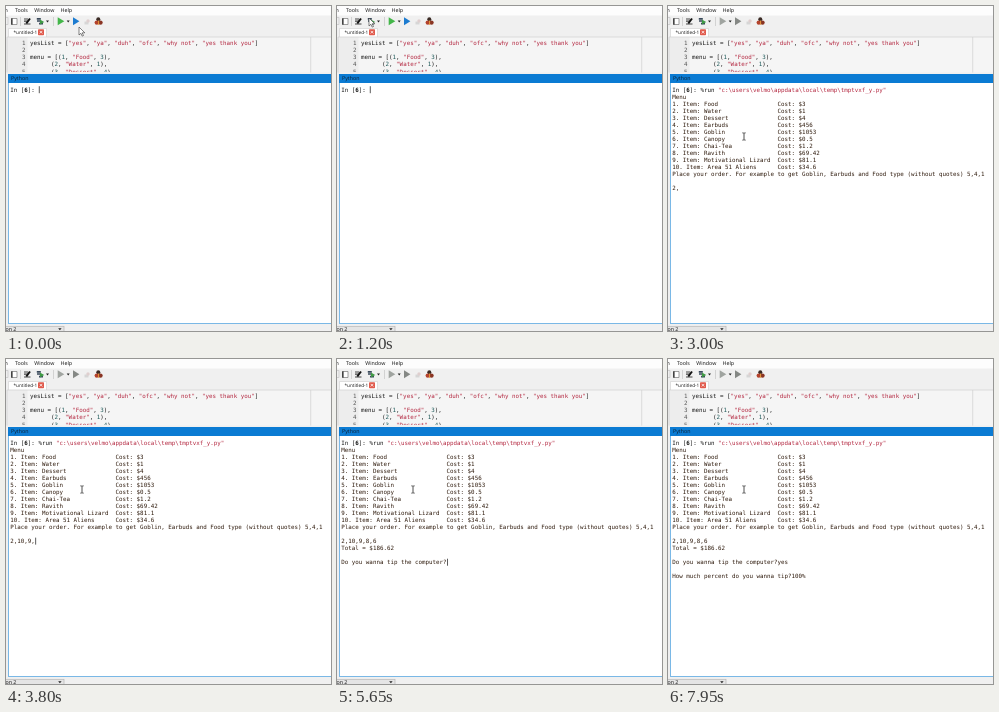
These frames come from a looping animation (325 by 325 pixels, 8000 ms). An HTML page:

```html
<!DOCTYPE html>
<html lang="en">
<head>
<meta charset="utf-8">
<title>Menu console</title>
<style>
  html, body { margin: 0; width: 100%; height: 100%; overflow: hidden; background: #f0f0f0; }
  svg { display: block; width: 100vw; height: 100vh; }
  text { white-space: pre; text-rendering: geometricPrecision; }
  .ui { font: 5.3px "Open Sans", "Noto Sans", sans-serif; fill: #111; }
  .mono { font: 5.84px "DejaVu Sans Mono", monospace; fill: #151515; }
  .out { fill: #2e1a0c; }
  .num { fill: #555; text-anchor: end; }
  .str { fill: #b3263f; }
  .lit { fill: #1f5a5a; }
  .go { fill: #43b649; }
  .step { fill: #1c7bd0; }
  .running .go { fill: #a0a4a0; }
  .running .step { fill: #858885; }
</style>
</head>
<body>
<svg id="stage" viewBox="0 0 325 325">
  <rect width="325" height="325" fill="#f0f0f0"/>
  <rect width="325" height="9.5" fill="#fdfdfd"/>
  <g class="ui">
    <text x="-1.5" y="6.4">n</text>
    <text x="9" y="6.4">Tools</text>
    <text x="28.3" y="6.4">Window</text>
    <text x="54.5" y="6.4">Help</text>
  </g>

  <g id="toolbar">
    <path d="M0 11.5h2v7h-2M14.5 11v9M47.5 11v9" fill="none" stroke="#c4c4c4" stroke-width=".7"/>
    <path d="M6 12.5h5v6h-5z" fill="#fff" stroke="#777" stroke-width=".7"/>
    <path d="M5.8 12.2v6.6" stroke="#222" stroke-width="1.2"/>
    <path d="M18 13h4M18 15.2h4M18 18h6.5" stroke="#444" stroke-width="1.2"/>
    <path d="M20.3 17.5l3.7-5" stroke="#111" stroke-width="2"/>
    <path d="M30.8 12.8h4M31 15h4M33 17.6h4" stroke="#39485a" stroke-width="1.7"/>
    <path d="M34 13.6l4.2 2.4-4.2 2.4z" fill="#3f9a44"/>
    <path d="M40 14.6h3l-1.5 1.8zM60.7 14.6h3l-1.5 1.8z" fill="#222"/>
    <path class="go" d="M51.7 11.3l6.6 4-6.6 4z"/>
    <path class="step" d="M67 11.3l6.4 4-6.4 4z"/>
    <path d="M78.5 15.5h4v3h-4z" fill="#d6d6d6"/>
    <circle cx="82" cy="15" r="1.7" fill="#dfcfcf"/>
    <circle cx="92.3" cy="13.2" r="2" fill="#3a2a24"/>
    <circle cx="90.8" cy="16.6" r="2.2" fill="#b4432c"/>
    <circle cx="94.5" cy="16.6" r="2.2" fill="#8a3524"/>
    <path d="M92.6 14.5v4.3" stroke="#e79a3c" stroke-width="1"/>
  </g>

  <path d="M2.5 31V22.5H40.5V31" fill="#fff" stroke="#cfcfcf" stroke-width=".6"/>
  <text class="ui" x="7.5" y="28" style="font-size:4.7px">*untitled-1</text>
  <rect x="32" y="23.2" width="6" height="6" rx=".8" fill="#e05a4c"/>
  <path d="M33.7 24.9l2.6 2.6m0-2.6l-2.6 2.6" stroke="#fff" stroke-width=".8"/>

  <rect x="1" y="31" width="324" height="35.5" fill="#f5f5f5"/>
  <rect x="1" y="31" width="20.5" height="35.5" fill="#ededed"/>
  <path d="M1 31h324M1 31v35.5M304.7 31v35.5" fill="none" stroke="#cfcfcf" stroke-width=".7"/>
  <clipPath id="editorClip"><rect x="1" y="31" width="324" height="35"/></clipPath>
  <g id="editor" class="mono" clip-path="url(#editorClip)"></g>

  <rect x="2" y="68" width="323" height="250" fill="#7ab8e6"/>
  <rect x="2" y="68" width="323" height="9" fill="#0b7bd3"/>
  <rect x="3" y="77" width="322" height="240" fill="#fff"/>
  <text class="ui" x="5" y="74.4" style="fill:#0c2033">Python</text>

  <rect x="-2" y="320.3" width="60" height="7" fill="#e5e5e5" stroke="#b5b5b5" stroke-width=".7"/>
  <text class="ui" x="-.5" y="325.4">on 2</text>
  <path d="M52.2 322.3h3.4l-1.7 2z" fill="#222"/>

  <text class="mono" x="4.3" y="85.6">In [<tspan font-weight="bold">6</tspan>]: <tspan id="command"></tspan></text>
  <g id="console" class="mono out"></g>
  <rect id="caret" width=".8" height="7" fill="#333"/>

  <path id="arrow" d="M0 0v8l1.9-1.7 1.3 2.8 1.3-.6-1.3-2.7h2.6z" fill="#fff" stroke="#333" stroke-width=".6"/>
  <path id="beam" d="M-1.6-3.6h1.2l.4.4.4-.4h1.2M0-3.2v6.4M-1.6 3.6h1.2l.4-.4.4.4h1.2" fill="none" stroke="#222" stroke-width=".8"/>
</svg>
<script>
const LOOP = 8000, RUN = 1450, BLINK = 500;
const LEFT = 4.3, TOP = 85.6, PITCH = 7.03, CHAR = 3.516;
const $ = id => document.getElementById(id);

function addText(parent, x, y, content, className = '') {
  const node = document.createElementNS('http://www.w3.org/2000/svg', 'text');
  node.setAttribute('x', x);
  node.setAttribute('y', y);
  node.setAttribute('class', className);
  node.innerHTML = content;
  parent.append(node);
}

const highlight = code => code.replace(/"[^"]*"|\b\d+\b/g, token =>
  `<tspan class='${token[0] === '"' ? 'str' : 'lit'}'>${token}</tspan>`);

[
  'yesList = ["yes", "ya", "duh", "ofc", "why not", "yes thank you"]',
  '',
  'menu = [(1, "Food", 3),',
  '      (2, "Water", 1),',
  '      (3, "Dessert", 4),'
].forEach((code, i) => {
  const y = 39.4 + i * PITCH;
  addText($('editor'), 19.5, y, i + 1, 'num');
  addText($('editor'), 24, y, highlight(code));
});

const items = [
  ['Food', 3], ['Water', 1], ['Dessert', 4], ['Earbuds', 456], ['Goblin', 1053],
  ['Canopy', 0.5], ['Chai-Tea', 1.2], ['Ravith', 69.42],
  ['Motivational Lizard', 81.1], ['Area 51 Aliens', 34.6]
];
const menu = items.map(([name, cost], i) =>
  `${i + 1}. Item: ${name}`.padEnd(30) + `Cost: $${cost}`).join('\n');
const command = '%run <tspan class="str">"c:\\users\\velmo\\appdata\\local\\temp\\tmptvxf_y.py"</tspan>';

// Console output and key presses: [time, appended text]
const events = [
  [0, ''],
  [RUN, `\nMenu\n${menu}\nPlace your order. For example to get Goblin, Earbuds and Food type (without quotes) 5,4,1\n\n`],
  [2200, '2'], [2450, ','], [3100, '1'], [3250, '0'], [3400, ','],
  [3600, '9'], [3800, ','], [4000, '8'], [4450, ','], [4550, '6'],
  [4650, '\nTotal = $186.62\n\nDo you wanna tip the computer?'],
  [5900, 'y'], [6050, 'e'], [6200, 's'],
  [6500, '\n\nHow much percent do you wanna tip?'],
  [7000, '1'], [7150, '0'], [7250, '0'], [7400, '%']
];

// Pointer path: [time, x, y]
const path = [
  [0, 73, 21], [400, 67, 13], [850, 53, 14], [1200, 32, 12],
  [1400, 53, 14], [1500, 54, 16], [1750, 76, 130.5], [LOOP, 76, 130.5]
];

function pointerAt(t) {
  const i = path.findIndex(p => p[0] > t);
  const [t0, x0, y0] = path[i - 1], [t1, x1, y1] = path[i];
  const u = (t - t0) / (t1 - t0), k = u * u * (3 - 2 * u);
  return [x0 + (x1 - x0) * k, y0 + (y1 - y0) * k];
}

let shown = 0;
function showConsole(count) {
  const lines = events.slice(0, count).map(e => e[1]).join('').split('\n');
  const row = lines.length - 1;
  const column = row ? lines[row].length : 8;
  $('console').replaceChildren();
  lines.forEach((line, i) => line && addText($('console'), LEFT, TOP + i * PITCH, line));
  $('command').innerHTML = row ? command : '';
  $('toolbar').classList.toggle('running', row > 0);
  $('caret').setAttribute('x', LEFT + column * CHAR + .4);
  $('caret').setAttribute('y', TOP + row * PITCH - 5.4);
  shown = count;
}

function draw(now) {
  const t = now % LOOP;
  const past = events.filter(e => e[0] <= t);
  if (past.length !== shown) showConsole(past.length);

  const idle = t - past[past.length - 1][0];
  $('caret').style.visibility = Math.floor(idle / BLINK) % 2 ? 'hidden' : 'visible';

  const [x, y] = pointerAt(t);
  const overConsole = y > 77;
  for (const [id, visible] of [['arrow', !overConsole], ['beam', overConsole]]) {
    $(id).setAttribute('transform', `translate(${x} ${y})`);
    $(id).style.visibility = visible ? 'visible' : 'hidden';
  }
  requestAnimationFrame(draw);
}

draw(0);
</script>
</body>
</html>
```
